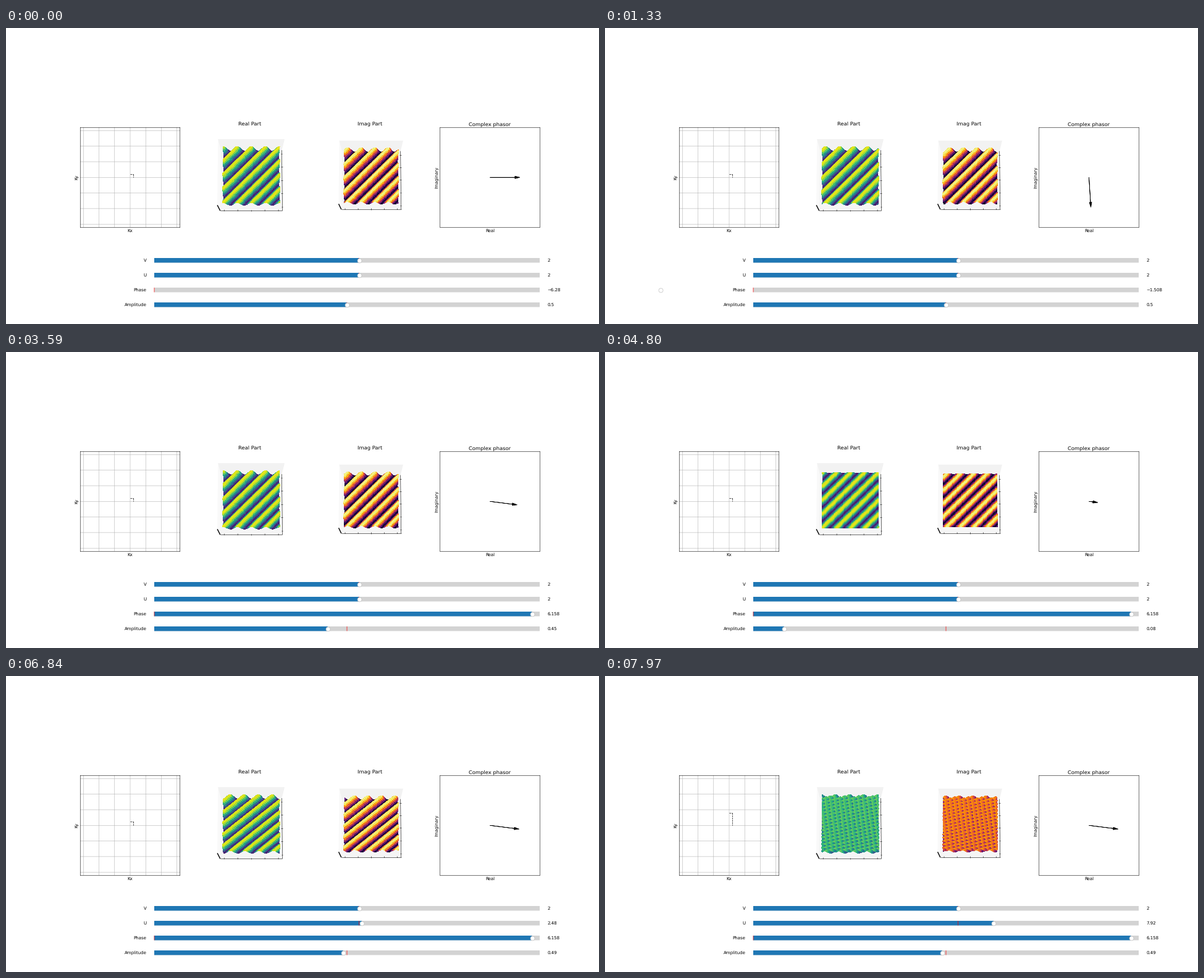
Recreate the animation shown at these times as a matplotlib script. Size 960x480 px, loop 8000 ms.

```python
import numpy as np
import matplotlib.pyplot as plt
from matplotlib.animation import FuncAnimation
from matplotlib.collections import PolyCollection
from matplotlib.patches import FancyArrow, Polygon, Rectangle

W, H, DPI = 960, 480, 50
FRAMES, INTERVAL = 200, 40
STEP_MS = 41.75            # time between two visible updates

SIDE = 744 / 4.6           # side of each square panel
TOP = 242.4 - SIDE / 2
LEFT = [120 + 1.2 * SIDE * i for i in range(4)]

plt.rcParams.update({"font.family": "DejaVu Sans", "font.size": 10,
                     "text.hinting": "none"})
fig = plt.figure(figsize=(W / DPI, H / DPI), dpi=DPI, facecolor="white")

# One overlay in pixel units carries the titles, surfaces and sliders.
stage = fig.add_axes([0, 0, 1, 1])
stage.set(xlim=(0, W), ylim=(H, 0))
stage.axis("off")


def crisp(v):
    """Centre of the nearest half pixel, so thin lines stay sharp."""
    return (np.floor(2 * v + 0.5) + 0.5) / 2


def title(left, text):
    stage.text(left + SIDE / 2, TOP - 3.6, text, size=12, ha="center")


def panel(left, lim, xlabel, ylabel):
    x0, x1 = crisp(left), crisp(left + SIDE)
    y0, y1 = crisp(H - TOP - SIDE), crisp(H - TOP)
    ax = fig.add_axes([x0 / W, y0 / H, (x1 - x0) / W, (y1 - y0) / H])
    ax.set(xlim=(-lim, lim), ylim=(-lim, lim), xlabel=xlabel, ylabel=ylabel)
    ax.tick_params(length=0, labelbottom=False, labelleft=False)
    for spine in ax.spines.values():
        spine.set_snap(False)
    return ax


class Surface:
    """Perspective view of z(x, y) from 80 degrees above."""
    ELEV = np.radians(80)
    EDGE = 1.1 * 25 / 24   # half size of the box in data units
    LINE = np.linspace(-1, 1, 50)

    def __init__(self, left, name, cmap, zoom):
        self.cx = left + SIDE * 0.095 / 0.185
        self.cy = TOP + SIDE * 0.09 / 0.185
        self.zoom = zoom
        self.x, self.y = np.meshgrid(self.LINE, self.LINE)
        title(left, name)
        self.draw_box()
        self.mesh = PolyCollection(np.zeros((1, 4, 2)), cmap=cmap,
                                   edgecolors="none", antialiaseds=False,
                                   zorder=3)
        stage.add_collection(self.mesh, autolim=False)

    def project(self, x, y, z):
        x, y = 0.5195 * self.zoom * x, 0.5195 * self.zoom * y
        z = 0.3896 * self.zoom * z
        s, c = np.sin(self.ELEV), np.cos(self.ELEV)
        depth = 10 + y * c - z * s
        scale = SIDE / 0.185 / depth
        return self.cx + x * scale, self.cy - (y * s + z * c) * scale, depth

    def line(self, a, b, lw=0.8):
        p, q = self.project(*a), self.project(*b)
        stage.plot([p[0], q[0]], [p[1], q[1]], color="k", lw=lw,
                   solid_capstyle="butt", zorder=2)

    def draw_box(self):
        e = self.EDGE
        walls = [
            ([(-e, -e, -e), (-e, e, -e), (-e, e, e), (-e, -e, e)], "#f9f9f9"),
            ([(-e, e, -e), (e, e, -e), (e, e, e), (-e, e, e)], "#f2f2f2"),
            ([(-e, -e, -e), (e, -e, -e), (e, e, -e), (-e, e, -e)], "#f5f5f5"),
        ]
        for corners, color in walls:
            pts = [self.project(*c)[:2] for c in corners]
            stage.add_patch(Polygon(pts, fc=color, ec="none", zorder=1))
        self.line((-e, -e, -e), (e, -e, -e))
        self.line((e, -e, -e), (e, e, -e))
        self.line((-e, -e, -e), (-e, -e, e), lw=2)
        for t in np.linspace(-1, 1, 5):
            self.line((t, -e - 0.02, -e), (t, -e + 0.04, -e))
            self.line((e - 0.04, t, -e), (e + 0.02, t, -e))

    def update(self, z, amp):
        px, py, depth = self.project(self.x, self.y, z)

        def corners(g):
            return np.stack([g[:-1, :-1], g[:-1, 1:], g[1:, 1:], g[1:, :-1]],
                            axis=-1).reshape(-1, 4)

        order = np.argsort(-corners(depth).mean(axis=1), kind="stable")
        quads = np.stack([corners(px), corners(py)], axis=-1)
        self.mesh.set_verts(quads[order])
        self.mesh.set_array(corners(z).mean(axis=1)[order])
        self.mesh.set_clim(-amp, amp)


class SliderBar:
    X0, LEN, THICK = 240, 624, 7.5

    def __init__(self, row, name, lo, hi, init, fmt):
        self.lo, self.hi, self.fmt = lo, hi, fmt
        y = 376.75 + 24 * row
        top = y - self.THICK / 2
        self.bar(top, self.LEN, "lightgrey")
        self.fill = self.bar(top, 0, "#1f77b4")
        x = self.pos(init)
        stage.plot([x, x], [top, top + self.THICK], color="r", lw=1,
                   solid_capstyle="butt", snap=False)
        self.knob, = stage.plot([x], [y], "o", ms=10, mfc="white",
                                mec="0.75", mew=1)
        stage.text(self.X0 - 0.02 * self.LEN, y, name, ha="right", va="center")
        self.text = stage.text(self.X0 + 1.02 * self.LEN, y, "", va="center")

    def bar(self, top, width, color):
        return stage.add_patch(Rectangle((self.X0, top), width, self.THICK,
                                         fc=color, ec="none", snap=False))

    def pos(self, v):
        return self.X0 + self.LEN * (v - self.lo) / (self.hi - self.lo)

    def set(self, v):
        x = self.pos(v)
        self.fill.set_width(max(0, x - self.X0))
        self.knob.set_xdata([x])
        self.text.set_text(self.fmt(v).replace("-", "\u2212"))


def short(v):
    return f"{v:.2f}".rstrip("0").rstrip(".")


def phase_text(v):
    return f"{v:.2f}" if v < 2 * np.pi - 10 else f"{v:.3f}"


freq = panel(LEFT[0], 32, "Kx", "Ky")
freq.set_xticks(range(-30, 31, 10))
freq.set_yticks(range(-30, 31, 10))
freq.grid(color="#b0b0b0", lw=0.8, snap=False)
across, = freq.plot([], [], "k--", lw=1)
down, = freq.plot([], [], "k--", lw=1)

real = Surface(LEFT[1], "Real Part", "viridis", 1)
imag = Surface(LEFT[2], "Imag Part", "inferno", 0.96)

plane = panel(LEFT[3], 1, "Real", "Imaginary")
plane.set_xticks([])
plane.set_yticks([])
title(LEFT[3], "Complex phasor")
arrow = FancyArrow(0, 0, 0.5, 0, width=0.001, head_width=0.05,
                   head_length=0.1, fc="k", ec="k")
plane.add_patch(arrow)

v_bar = SliderBar(0, "V", -32, 32, 2, short)
u_bar = SliderBar(1, "U", -32, 32, 2, short)
phase_bar = SliderBar(2, "Phase", 0, 2 * np.pi, 0, phase_text)
amp_bar = SliderBar(3, "Amplitude", 0, 1, 0.5, short)


def state(i):
    """Phase sweep, then amplitude down and up, then U rising."""
    phase = (min(i, 99) - 50) * 2 * np.pi / 50
    amp = abs(150 - min(max(i, 100), 199)) / 100
    u = 2 + 0.16 * max(0, i - 200)
    return 2, u, phase, amp


def update(n):
    k = int((n * INTERVAL + 35) / STEP_MS)
    v, u, phase, amp = state(max(k, int(1.2515 * k - 1.75)))

    angle = 2 * np.pi * (v * real.x - u * real.y) + phase
    real.update(amp * np.cos(angle), amp)
    imag.update(amp * np.sin(angle), amp)

    across.set_data([0, v], [u, u])
    down.set_data([v, v], [u, 0])
    arrow.set_data(dx=amp * np.cos(phase), dy=amp * np.sin(phase))

    for bar, value in ((v_bar, v), (u_bar, u),
                       (phase_bar, phase), (amp_bar, amp)):
        bar.set(value)


anim = FuncAnimation(fig, update, frames=FRAMES, interval=INTERVAL,
                     repeat=True, repeat_delay=0, blit=False,
                     cache_frame_data=False)
plt.show()
```
